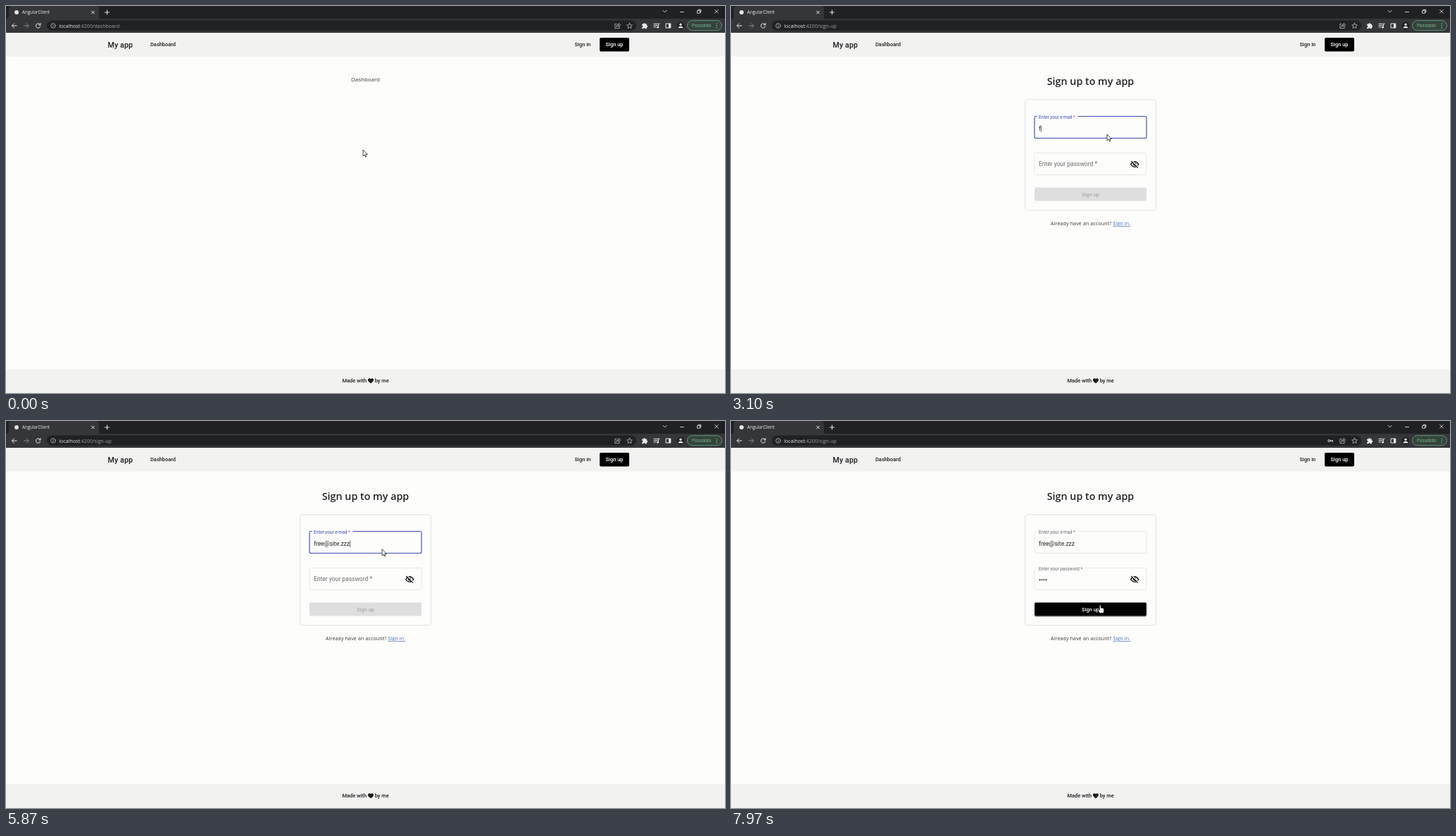
Animation, 1021 px wide and 549 px high, one loop 8000 ms. Source, as an HTML page:

```html
<!DOCTYPE html>
<html lang="en">
<head>
<meta charset="utf-8">
<title>Sign up flow</title>
<style>
html, body { margin: 0; width: 100%; height: 100%; overflow: hidden; background: #fdfdfc; }
svg.stage { position: fixed; inset: 0; width: 100%; height: 100%; display: block; }
text { font-family: Roboto, "Liberation Sans", sans-serif; font-size: 7.45px; white-space: pre; }
.ui { font-family: "Open Sans", "Noto Sans", sans-serif; }
.med { font-weight: 500; fill: #1c1c1c; }
.big { font-size: 8.51px; }
.mid { text-anchor: middle; }
.icon { fill: none; stroke: #e8eaed; stroke-width: 1; stroke-linecap: round; stroke-linejoin: round; }
.solid { fill: #e8eaed; stroke: none; }
</style>
</head>
<body>
<svg class="stage" viewBox="0 0 1021 549" preserveAspectRatio="none">
  <rect width="1021" height="549" fill="#fdfdfc"/>

  <g id="browser">
    <rect width="1021" height="38" fill="#202122"/>
    <path d="M0 18H1021V38H0Z" fill="#35363a"/>
    <path d="M1 18Q4 18 4 15V4Q4 0 8 0H128Q132 0 132 4V15Q132 18 135 18Z" fill="#35363a"/>
    <circle cx="15" cy="9" r="3" fill="#e4e5e7"/>
    <text class="ui" x="23" y="11.2" font-size="6.2" style="font-size:6.2px" fill="#e8eaed">AngularClient</text>
    <rect x="58" y="20.5" width="837" height="14.5" rx="7.25" fill="#202122"/>
    <text class="ui" x="75.3" y="30.5" style="font-size:7.07px" fill="#9aa0a6"><tspan fill="#e8eaed">localhost</tspan>:4200/<tspan id="route">dashboard</tspan></text>
    <g class="icon">
      <path d="M121.6 7.1l3.8 3.8m0-3.8l-3.8 3.8M143.5 6v6m-3-3h6"/>
      <path d="M15.2 28H8.6m3-3.2L8.4 28l3.2 3.2"/>
      <path d="M25.5 28h6.6m-3-3.2l3.2 3.2-3.2 3.2" stroke="#85878a"/>
      <path d="M48.4 26.2A3.2 3.2 0 1 0 48.8 29M49 24.5v2.4h-2.4"/>
      <g stroke="#c4c7ca" stroke-width=".75">
        <circle cx="67" cy="28" r="3.3"/>
        <path d="M67 27.7v1.8M67 26.2v.1"/>
        <path d="M867 25.4h-2.2v6.3h6.2v-2M866.7 29.3q.4-3.1 3.5-3.1v-1.7l2.4 2.5-2.4 2.4v-1.7q-2.2 0-3.5 1.6"/>
        <path d="M885.5 24.2l1.1 2.5 2.8.3-2.1 1.8.7 2.8-2.5-1.5-2.5 1.5.7-2.8-2.1-1.8 2.8-.3z"/>
      </g>
      <path class="solid" d="M903.2 25.6h2.1a1.3 1.3 0 0 1 2.6 0h2v2.1a1.3 1.3 0 0 1 0 2.6v1.9h-2.3a1.1 1.1 0 0 0-2.2 0h-2.2v-2.1a1.2 1.2 0 0 0 0-2.4z"/>
      <path d="M920 25.3h5.2M920 27.6h5.2M920 29.9h2.8M926.4 30V25.2h1.7"/>
      <circle class="solid" cx="925.4" cy="30.2" r="1.3"/>
      <rect x="937.4" y="25" width="6.4" height="6"/>
      <path class="solid" d="M941 25h3v6h-3z"/>
      <circle cx="958" cy="28" r="5.4" fill="#202122" stroke="none"/>
      <circle class="solid" cx="958" cy="26.3" r="1.7"/>
      <path class="solid" d="M954.6 31.2q0-2.5 3.4-2.5t3.4 2.5z"/>
      <g stroke-width=".85">
        <path d="M933 6.3l2.6 2.6 2.6-2.6M957.5 8.5h5M1006.6 5.4l4.6 4.6m0-4.6l-4.6 4.6"/>
        <path d="M982 6.6h3.6v3.6H982zM983.2 6.4V5.2h3.6v3.7h-1"/>
      </g>
      <g id="key">
        <circle cx="849.4" cy="28" r="1.5"/>
        <path d="M851.2 28h3.6m-1 0v1.4"/>
      </g>
    </g>
    <rect x="967.5" y="20.7" width="49" height="14" rx="7" fill="#34433d" stroke="#6fae83" stroke-width=".8"/>
    <text class="ui" x="974" y="30" style="font-size:6.2px" fill="#81c995">Posodobi</text>
    <g fill="#81c995"><circle cx="1009.3" cy="25.3" r=".75"/><circle cx="1009.3" cy="28" r=".75"/><circle cx="1009.3" cy="30.7" r=".75"/></g>
  </g>

  <g id="frame">
    <path d="M0 38H1021V71.5H0ZM0 515H1021V549H0Z" fill="#f2f2f1"/>
    <text class="med" x="144.5" y="58.6" style="font-size:10.64px;letter-spacing:.13px">My app</text>
    <text class="med" x="205" y="57">Dashboard</text>
    <text class="med" x="807.6" y="57">Sign in</text>
    <rect x="843" y="45" width="42" height="19.5" rx="2" fill="#000"/>
    <text class="med mid" x="864" y="57" style="fill:#fff">Sign up</text>
    <text class="med" x="477.5" y="534.2">Made with</text>
    <path d="M518 535.3C513.6 532 513.9 530.6 514 529.9C514.4 527.8 517 527.6 518 529.3C519 527.6 521.6 527.8 522 529.9C522.1 530.6 522.4 532 518 535.3Z" fill="#1c1c1c"/>
    <text class="med" x="523.7" y="534.2">by me</text>
  </g>

  <text id="home" class="ui mid" x="510.5" y="107" style="font-size:7.93px" fill="#3a3a3a">Dashboard</text>

  <g id="signup">
    <text class="ui mid" x="510.5" y="112.3" style="font-size:14.3px;font-weight:600" fill="#222">Sign up to my app</text>
    <rect x="417.8" y="132.8" width="185.5" height="157" rx="3" fill="none" stroke="#dadada" stroke-width=".8"/>
    <g id="fields"></g>
    <g fill="none" stroke="#1c1c1c" stroke-width="1.3">
      <path d="M567.6 224.6Q573.2 216.9 578.8 224.6Q573.2 232.3 567.6 224.6Z"/>
      <circle cx="573.2" cy="224.6" r="1.6" fill="#1c1c1c"/>
      <path d="M569 219.2l9.6 9.6" stroke="#fdfdfc"/>
      <path d="M568.2 220l9.6 9.6"/>
    </g>
    <rect id="shade" x="431" y="258.6" width="159" height="19" rx="2" fill="#000"/>
    <rect id="submit" x="431" y="257.5" width="159" height="19" rx="2"/>
    <text id="submitText" class="med mid" x="510.5" y="269.6">Sign up</text>
    <text class="ui" x="454" y="311.4" style="font-size:6.95px;letter-spacing:.19px" fill="#333">Already have an account? <tspan fill="#3f62b8" text-decoration="underline">Sign in.</tspan></text>
  </g>

  <g id="mouse" stroke="#111" stroke-width=".75" stroke-linejoin="round" fill="#fff">
    <path id="arrow" d="M0 0V9L2.1 7.1L3.5 10.1L4.9 9.5L3.6 6.5H6.3Z"/>
    <path id="hand" d="M-1 .8Q0-.7 1 .8V4Q2 3.3 2.6 4.3Q3.6 3.7 4.1 4.7Q5.3 4.3 5.3 5.6V8Q5.3 9.5 4.4 11.3H-.7L-3 7.6Q-3.4 6.2-2.2 6.4L-1 7.3Z"/>
  </g>
</svg>
<script>
const LOOP = 8000;
const OPEN = 1750, FOCUS_MAIL = 2700, FOCUS_PASS = 5900, SUBMIT = 7800;
const MAIL = "free@site.zzz";
const mailKeys = [3050, 3190, 3330, 3470, 3800, 4300, 4430, 4560, 4700, 5150, 5350, 5500, 5640];
const passKeys = [6250, 6450, 6650, 6850];
// time, x, y of the pointer tip
const route = [[0, 507, 204], [350, 507, 204], [1300, 878.5, 62], [1850, 878.5, 62],
  [2330, 532.5, 183], [2450, 532.5, 183], [2620, 534, 182], [7050, 534, 182], [7600, 524.3, 261.2], [LOOP, 524.3, 261.2]];

const $ = id => document.getElementById(id);
const clamp = v => Math.max(0, Math.min(1, v));
const ease = v => v * v * (3 - 2 * v);
const show = (el, on) => el.setAttribute("visibility", on ? "inherit" : "hidden");
const set = (el, attrs) => { for (const k in attrs) el.setAttribute(k, attrs[k]); };
const inside = (p, x, y, w, h) => p.x >= x && p.x <= x + w && p.y >= y && p.y <= y + h;
const typed = (keys, t) => keys.filter(k => k <= t).length;

function add(parent, tag, attrs) {
  const el = document.createElementNS("http://www.w3.org/2000/svg", tag);
  set(el, attrs);
  return parent.appendChild(el);
}

function makeField(y, title, notch) {
  const g = add($("fields"), "g", {});
  const box = add(g, "rect", { x: 431, y, width: 159, height: 31, rx: 2, fill: "none" });
  const gap = add(g, "rect", { x: 434.5, y: y - 1, height: 2.2, fill: "#fdfdfc" });
  const label = add(g, "text", { class: "big" });
  label.textContent = title + " ";
  const star = add(label, "tspan", {});
  star.textContent = "*";
  const value = add(g, "text", { class: "big", x: 437, y: y + 20.4, fill: "#222" });
  const dots = passKeys.map((_, i) => add(g, "circle", { cx: 438.5 + i * 2.95, cy: y + 16.7, r: 1, fill: "#222" }));
  const caret = add(g, "rect", { y: y + 13, width: .6, height: 9.5, fill: "#111" });

  return ({ t, p, start, end, keys, text }) => {
    const focused = t >= start && t < end;
    const hover = inside(p, 431, y, 159, 31);
    const up = ease(clamp((t - start) / 150));
    const n = typed(keys, t);
    set(box, {
      stroke: focused ? "#3f4db5" : hover ? "#212121" : "#dfdfdf",
      "stroke-width": focused || hover ? 1.15 : .7
    });
    gap.setAttribute("width", (notch - 434.5) * up);
    set(label, {
      transform: `translate(437 ${y + 18.5 - 15.4 * up}) scale(${1 - .25 * up})`,
      fill: focused ? "#3f4db5" : "#6b6b6b"
    });
    star.setAttribute("fill", focused ? "#e0407f" : "#6b6b6b");
    value.textContent = text ? text.slice(0, n) : "";
    dots.forEach((d, i) => show(d, !text && i < n));
    const last = n ? keys[n - 1] : start;
    show(caret, focused && Math.floor((t - last) / 500) % 2 === 0);
    const width = text ? (n ? value.getComputedTextLength() : 0) : n * 2.95;
    caret.setAttribute("x", 437 + width);
  };
}

const mailField = makeField(156.5, "Enter your e-mail", 492.5);
const passField = makeField(208.5, "Enter your password", 503);

function pointer(t) {
  const i = Math.max(1, route.findIndex(k => k[0] >= t));
  const [t0, x0, y0] = route[i - 1], [t1, x1, y1] = route[i];
  const k = ease(clamp((t - t0) / (t1 - t0)));
  return { x: x0 + (x1 - x0) * k, y: y0 + (y1 - y0) * k };
}

function render(t) {
  const p = pointer(t);
  const opened = t >= OPEN;
  const ready = t >= passKeys[0];
  show($("home"), !opened);
  show($("signup"), opened);
  show($("key"), ready);
  $("route").textContent = opened ? "sign-up" : "dashboard";

  if (opened) {
    mailField({ t, p, start: FOCUS_MAIL, end: FOCUS_PASS, keys: mailKeys, text: MAIL });
    passField({ t, p, start: FOCUS_PASS, end: SUBMIT, keys: passKeys });
  } else {
    // hidden children must not show through the closed form
    $("fields").querySelectorAll("[visibility]").forEach(el => show(el, false));
  }

  const overSubmit = opened && inside(p, 431, 257.5, 159, 19);
  $("submit").setAttribute("fill", ready ? "#000" : "#dededf");
  $("submitText").style.fill = ready ? "#fff" : "#aaaaad";
  set($("shade"), { opacity: ready ? .3 : 0, y: overSubmit ? 259 : 258.2 });

  const pointing = overSubmit || inside(p, 843, 45, 42, 19.5);
  show($("arrow"), !pointing);
  show($("hand"), pointing);
  $("mouse").setAttribute("transform", `translate(${p.x} ${p.y})`);
}

const begin = performance.now();
function tick() {
  render((performance.now() - begin) % LOOP);
  requestAnimationFrame(tick);
}
tick();
</script>
</body>
</html>
```
